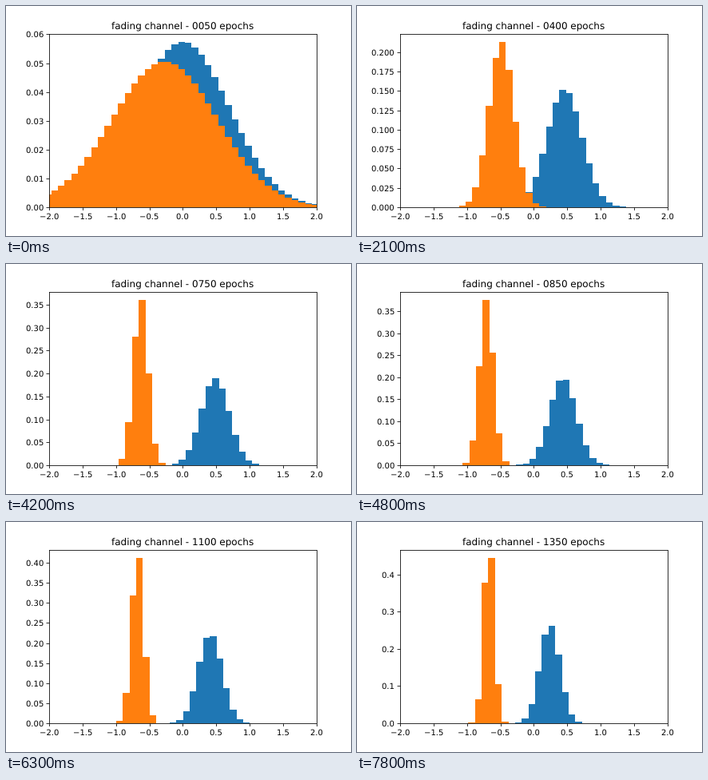
Recreate the animation shown at these times as an HTML page with a canvas. Size 432 by 288 pixels, loop 8 s.

```html
<!DOCTYPE html>
<html lang="en">
<head>
<meta charset="utf-8">
<title>Fading channel histogram</title>
<style>
  html, body { margin: 0; width: 100%; height: 100%; overflow: hidden; background: #fff; }
  canvas { display: block; width: 432px; height: 288px; }
</style>
</head>
<body>
<canvas id="stage" width="432" height="288"></canvas>
<script>
const ctx = document.getElementById('stage').getContext('2d');
const LOOP = 8000, STEP = 300, BIN = 0.1;
const LEFT = 54, RIGHT = 388.8, TOP = 34.56, BOTTOM = 252;
const UNIT = (RIGHT - LEFT) / 4;
const FONT = '"DejaVu Sans", sans-serif';
const BLUE = '#1f77b4', ORANGE = '#ff7f0e';

// Both distributions are bell curves that drift and narrow between key steps.
const bell = (mean, sd) => ({ mean, sd });
const keys = [
  { step: 0, edge: -0.07, orange: bell(-0.27, 0.79), blue: bell(0, 0.695) },
  { step: 4, edge: 0.005, orange: bell(-0.435, 0.268), blue: bell(0.495, 0.322) },
  { step: 10, edge: -0.0437, orange: bell(-0.533, 0.13), blue: bell(0.426, 0.213) },
  { step: 14, edge: 0.04, orange: bell(-0.63, 0.1088), blue: bell(0.485, 0.21) },
  { step: 19, edge: 0.0255, orange: bell(-0.8265, 0.1016), blue: bell(0.368, 0.187) },
  { step: 23, edge: -0.018, orange: bell(-0.522, 0.084), blue: bell(0.45, 0.17) },
  { step: 26, edge: 0.02, orange: bell(-0.67, 0.079), blue: bell(0.241, 0.15) }
];

const lerp = (a, b, u) => a + (b - a) * u;
const mix = (a, b, u) => bell(lerp(a.mean, b.mean, u), a.sd * Math.pow(b.sd / a.sd, u));

function poseAt(step) {
  const i = Math.max(1, keys.findIndex(k => k.step >= step));
  const a = keys[i - 1], b = keys[i];
  const u = (step - a.step) / (b.step - a.step);
  return {
    edge: lerp(a.edge, b.edge, u),
    orange: mix(a.orange, b.orange, u),
    blue: mix(a.blue, b.blue, u)
  };
}

function histogram({ mean, sd }, edge) {
  const bars = [];
  for (let n = -21; n <= 20; n++) {
    const x = edge + n * BIN, z = (x + BIN / 2 - mean) / sd;
    bars.push({ x, h: BIN / (sd * Math.sqrt(2 * Math.PI)) * Math.exp(-z * z / 2) });
  }
  return bars;
}

function drawBars(bars, color, scale) {
  ctx.fillStyle = color;
  for (const { x, h } of bars) {
    const x0 = Math.max(LEFT, Math.round(LEFT + (x + 2) * UNIT));
    const x1 = Math.min(389, Math.round(LEFT + (x + 2 + BIN) * UNIT));
    const y = Math.round(BOTTOM - h * scale);
    if (x1 > x0) ctx.fillRect(x0, y, x1 - x0, BOTTOM - y);
  }
}

function line(x0, y0, x1, y1) {
  ctx.beginPath();
  ctx.moveTo(x0, y0);
  ctx.lineTo(x1, y1);
  ctx.stroke();
}

// `anchor` is the share of the text that lies left of x.
function label(text, x, y, anchor, size = 10) {
  ctx.font = size + 'px ' + FONT;
  ctx.textRendering = 'geometricPrecision';
  ctx.fillText(text, Math.round(x - anchor * ctx.measureText(text).width), y);
}

const snap = v => Math.floor(v + 0.5) + 0.5;

// Smallest round interval that needs at most nine divisions.
function tickStep(max) {
  for (const power of [0.01, 0.1])
    for (const [m, digits] of [[1, 0], [2, 0], [2.5, 1], [5, 0]])
      if (max / (m * power) <= 9)
        return { size: m * power, digits: (power === 0.01 ? 2 : 1) + digits };
}

function drawAxes(max, scale) {
  ctx.strokeStyle = ctx.fillStyle = '#000';
  ctx.lineWidth = 0.8;
  for (let i = 0; i <= 8; i++) {
    const v = i / 2 - 2, x = LEFT + i * UNIT / 2;
    line(snap(x), 252.5, snap(x), 256);
    label(v.toFixed(1).replace('-', '\u2212'), x, 267, 0.5);
  }
  const { size, digits } = tickStep(max);
  for (let i = 0; i * size <= max; i++) {
    const y = BOTTOM - i * size * scale;
    line(50.5, snap(y), 54.5, snap(y));
    label((i * size).toFixed(digits), 47, Math.round(y + 4), 1);
  }
  ctx.strokeRect(54.5, 35.5, 335, 217);
}

function draw(step) {
  const pose = poseAt(step);
  const blue = histogram(pose.blue, pose.edge);
  const orange = histogram(pose.orange, pose.edge);
  const max = 1.05 * Math.max(...blue.concat(orange).map(b => b.h));
  const scale = (BOTTOM - TOP) / max;

  ctx.fillStyle = '#fff';
  ctx.fillRect(0, 0, 432, 288);
  drawBars(blue, BLUE, scale);
  drawBars(orange, ORANGE, scale);
  drawAxes(max, scale);
  const epochs = String(50 * (step + 1)).padStart(4, '0');
  label(`fading channel - ${epochs} epochs`, (LEFT + RIGHT) / 2, 29, 0.5, 12);
}

const start = performance.now();
function tick() {
  draw(Math.floor((performance.now() - start) % LOOP / STEP));
  requestAnimationFrame(tick);
}
tick();
</script>
</body>
</html>
```
